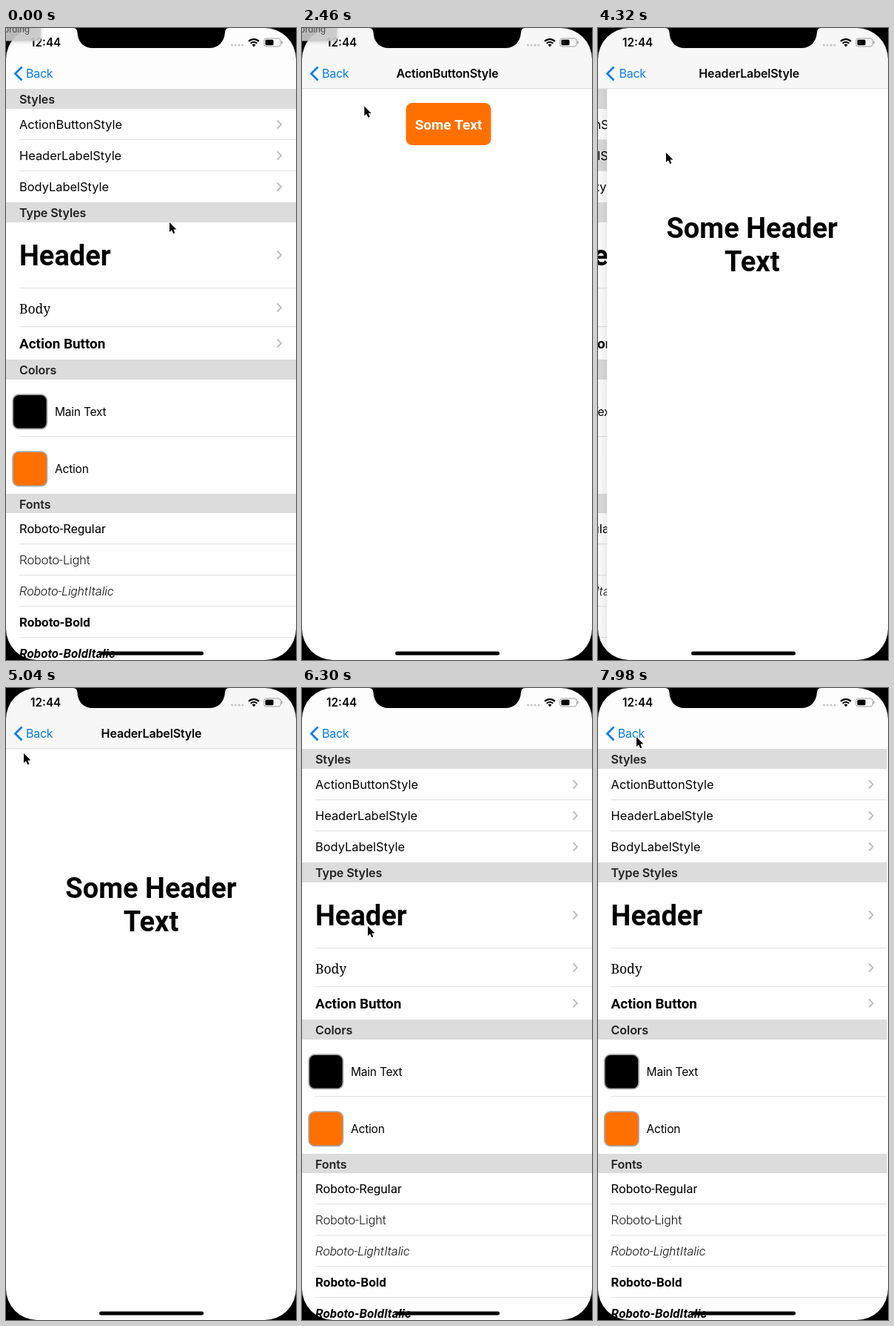
Recreate the animation shown at these times as an HTML page with a canvas. Size 392 by 852 pixels, loop 8000 ms.

```html
<!DOCTYPE html>
<html lang="en">
<head>
<meta charset="utf-8">
<title>Style browser</title>
<style>
html, body { margin: 0; width: 100%; height: 100%; overflow: hidden; background: #000; }
canvas { display: block; width: 392px; height: 852px; }
</style>
</head>
<body>
<canvas id="stage"></canvas>
<script>
const W = 392, H = 852, LOOP = 8000, NAV = 82;
const canvas = document.getElementById('stage');
const ctx = canvas.getContext('2d');
const dpr = window.devicePixelRatio || 1;
canvas.width = W * dpr;
canvas.height = H * dpr;

const UI = 'Inter, sans-serif', ROBOTO = 'Roboto, sans-serif';
const BODY = '16.1px ' + UI, ROW = '16.4px ' + UI, LABEL = '15.6px ' + UI, BOLD = '600 16.1px ' + UI;
const BLUE = '#067bf0', ORANGE = '#ff7000', INK = '#030303';
const PAPER = '#fefefe', BAND = '#dcdcdd', LINE = '#e4e4e5';

// Visits to a detail page: push time, pop time, row [top, height].
const visits = [
  { push: 835, pop: 2932, press: 750, backPress: 2690, row: [109, 41], page: actionPage, title: 'ActionButtonStyle' },
  { push: 4030, pop: 5230, press: 3940, backPress: 5150, row: [151, 41], page: headerPage, title: 'HeaderLabelStyle' },
  { push: 6385, pop: 7550, press: 6310, backPress: 7450, row: [262, 88], page: typePage, title: '' }
];

// Pointer stops: time, x, y.
const stops = [
  [0, 221, 262], [60, 221, 262], [660, 121, 136], [1340, 121, 136],
  [1680, 137, 156], [1960, 149, 153], [2250, 149, 153], [2660, 25, 62],
  [3360, 25, 62], [3840, 92, 168], [4580, 92, 168], [5040, 24, 88],
  [5140, 24, 64], [5700, 24, 64], [6240, 89, 321], [6960, 89, 321],
  [7400, 52, 66], [8000, 52, 66]
];

const clamp = v => Math.max(0, Math.min(1, v));
const mix = (a, b, k) => a + (b - a) * k;
const smooth = k => k * k * (3 - 2 * k);

// Critically damped spring of a navigation transition.
function spring(ms) {
  if (ms <= 0) return 0;
  if (ms > 540) return 1;
  const x = ms / 1000 * 18.26;
  return 1 - (1 + x) * Math.exp(-x);
}

function rect(x, y, w, h, color) {
  ctx.fillStyle = color;
  ctx.fillRect(x, y, w, h);
}

function round(x, y, w, h, r, color) {
  ctx.fillStyle = color;
  ctx.beginPath();
  ctx.roundRect(x, y, w, h, r);
  ctx.fill();
}

function text(str, x, y, font, color = INK, align = 'left', spacing = -0.1) {
  ctx.font = font;
  ctx.letterSpacing = spacing + 'px';
  ctx.textAlign = align;
  ctx.fillStyle = color;
  ctx.fillText(str, x, y);
}

function stroke(points, color, width) {
  ctx.strokeStyle = color;
  ctx.lineWidth = width;
  ctx.beginPath();
  points.forEach(([x, y]) => ctx.lineTo(x, y));
  ctx.stroke();
}

function band(label, y, h = 27) {
  rect(0, y, W, h, BAND);
  text(label, 18, y + 20, BOLD, '#222223');
}

function swatch(label, y, color) {
  round(8.3, y, 48, 48, 9, '#a8a8a8');
  round(10, y + 1.7, 44.6, 44.6, 7.5, color);
  text(label, 66, y + 30, LABEL, INK, 'left', -0.25);
}

function list(visit, selected) {
  rect(0, NAV, W, H - NAV, PAPER);
  if (selected) rect(0, visit.row[0], W, visit.row[1], '#dadadb');
  for (const y of [150, 192, 350, 402, 550, 695, 737, 779, 821])
    rect(18, y, W - 18, 1.2, LINE);

  band('Styles', 82);
  text('ActionButtonStyle', 18, 136, ROW, INK, 'left', 0);
  text('HeaderLabelStyle', 18, 178, ROW, INK, 'left', 0);
  text('BodyLabelStyle', 18, 220, ROW, INK, 'left', 0);
  band('Type Styles', 235);
  text('Header', 18, 319.5, 'bold 38px ' + ROBOTO, INK, 'left', 0);
  text('Body', 18, 384.5, '17.6px "Noto Serif", serif');
  text('Action Button', 18, 432, 'bold 18.9px ' + ROBOTO, INK, 'left', 0);
  for (const y of [130, 172, 214, 306, 377, 425])
    stroke([[366.5, y - 5.5], [372, y], [366.5, y + 5.5]], '#bebec0', 1.9);

  band('Colors', 447);
  swatch('Main Text', 493.3, '#000');
  swatch('Action', 570.3, ORANGE);
  band('Fonts', 628, 26);
  const faces = [['Regular', ''], ['Light', '300 '], ['LightItalic', 'italic 300 '],
    ['Bold', 'bold '], ['BoldItalic', 'italic bold ']];
  faces.forEach(([name, style], i) =>
    text('Roboto-' + name, 18, 681 + 42 * i, style + '17px ' + ROBOTO, INK, 'left', 0));
}

function actionPage(t) {
  round(140.5, 101, 115, 57, 8.5, ORANGE);
  const down = clamp((t - 1620) / 60) * (1 - clamp((t - 1760) / 200));
  ctx.globalAlpha = 1 - 0.7 * down;
  text('Some Text', 198, 136.5, 'bold 18.9px ' + ROBOTO, '#fffdfa', 'center', 0);
  ctx.globalAlpha = 1;
}

function headerPage() {
  const font = 'bold 38px ' + ROBOTO;
  text('Some Header', 196, 283, font, INK, 'center', 0);
  text('Text', 196, 327.5, font, INK, 'center', 0);
}

function typePage() {
  text('Header', 196.5, 136.5, 'bold 38px ' + ROBOTO, INK, 'center', 0);
  text('Roboto-Bold - 40.0pt', 196.5, 161.5, BODY, INK, 'center');
}

function detail(visit, p, t) {
  ctx.save();
  ctx.translate((1 - p) * W, 0);
  if (p < 1) {
    const g = ctx.createLinearGradient(-8, 0, 0, 0);
    g.addColorStop(0, 'rgba(0,0,0,0)');
    g.addColorStop(1, `rgba(0,0,0,${0.05 * p})`);
    rect(-8, NAV, 8, H, g);
  }
  rect(0, NAV, W, H - NAV, PAPER);
  visit.page(t);
  ctx.restore();
}

function navBar(visit, p, dim) {
  const tone = mix(253, 247, p);
  rect(0, 0, W, NAV, `rgb(${tone},${tone},${tone})`);
  if (p > 0) {
    ctx.globalAlpha = p;
    rect(0, NAV - 0.8, W, 1, '#dcdcdd');
  }
  const level = 1 - 0.7 * dim;
  ctx.globalAlpha = level;
  stroke([[21.5, 52.5], [12.5, 61.5], [21.5, 70.5]], BLUE, 2.7);
  if (p < 1) {
    ctx.globalAlpha = (1 - p) * level;
    text('Back', 27 - 77 * p, 67, BODY, BLUE, 'left', -0.3);
  }
  if (p > 0) {
    ctx.globalAlpha = p * level;
    text('Back', 27 + 46 * (1 - p), 67, BODY, BLUE, 'left', -0.3);
    ctx.globalAlpha = p;
    text(visit.title, 196.5 + 247 * (1 - p), 67, BOLD, INK, 'center', -0.2);
  }
  ctx.globalAlpha = 1;
}

function statusBar() {
  text('12:44', 33, 25, '600 15.3px ' + UI, INK, 'left', 0);
  for (let i = 0; i < 4; i++) round(304 + 4.8 * i, 21.5, 3, 3, 1.5, '#c4c4c5');
  ctx.strokeStyle = INK;
  ctx.lineWidth = 2.2;
  for (const r of [6, 9.8]) {
    ctx.beginPath();
    ctx.arc(335, 25, r, -Math.PI * 0.75, -Math.PI * 0.25);
    ctx.stroke();
  }
  ctx.fillStyle = INK;
  ctx.beginPath();
  ctx.moveTo(335, 25.5);
  ctx.arc(335, 25, 3.4, -Math.PI * 0.75, -Math.PI * 0.25);
  ctx.fill();
  ctx.strokeStyle = '#a0a0a0';
  ctx.lineWidth = 1;
  ctx.beginPath();
  ctx.roundRect(348.8, 14, 22.4, 11, 3);
  ctx.stroke();
  round(350.5, 15.7, 11, 7.6, 1.5, INK);
  round(372.2, 17.6, 1.4, 4, 0.7, '#a0a0a0');
}

function bezel() {
  ctx.fillStyle = '#000';
  ctx.beginPath();
  ctx.rect(0, 0, W, H);
  ctx.roundRect(0, 0, W, H, 42);
  ctx.fill('evenodd');
  ctx.beginPath();
  ctx.moveTo(91, 0);
  ctx.quadraticCurveTo(96, 0, 96.5, 6);
  ctx.bezierCurveTo(97, 19, 105, 27, 117, 27);
  ctx.lineTo(275, 27);
  ctx.bezierCurveTo(287, 27, 295, 19, 296, 6);
  ctx.quadraticCurveTo(296.5, 0, 301, 0);
  ctx.fill();
  round(126, 840.5, 141, 5, 2.5, '#000');
}

function tip(t) {
  const a = 1 - clamp((t - 3300) / 240);
  if (a <= 0) return;
  ctx.save();
  ctx.globalAlpha = a;
  ctx.shadowColor = 'rgba(40,40,40,.3)';
  ctx.shadowBlur = 5 * dpr;
  rect(-4, -4, 51, 21.5, 'rgba(205,205,205,.9)');
  ctx.restore();
  ctx.globalAlpha = a;
  text('ording', 32, 6, '11.5px ' + UI, '#484848', 'right', 0);
  ctx.globalAlpha = 1;
}

function pointer(t) {
  let i = 1;
  while (i < stops.length - 1 && t > stops[i][0]) i++;
  const [t0, x0, y0] = stops[i - 1], [t1, x1, y1] = stops[i];
  const k = smooth(clamp((t - t0) / (t1 - t0)));
  ctx.save();
  ctx.translate(mix(x0, x1, k), mix(y0, y1, k));
  ctx.beginPath();
  for (const [x, y] of [[0, 0], [0, 13], [3, 10.3], [5.2, 15.2], [7.4, 14.2], [5.3, 9.5], [9.4, 9.4]])
    ctx.lineTo(x, y);
  ctx.closePath();
  ctx.lineJoin = 'round';
  ctx.lineWidth = 1.8;
  ctx.strokeStyle = '#fff';
  ctx.stroke();
  ctx.fillStyle = '#000';
  ctx.fill();
  ctx.restore();
}

function draw(t) {
  const visit = visits.find(v => t >= v.press && t < v.pop + 560);
  let p = 0, dim = 0;
  if (visit) {
    p = t < visit.pop ? spring(t - visit.push) : 1 - spring(t - visit.pop);
    dim = clamp((t - visit.backPress) / 40) * (1 - clamp((t - visit.pop) / 60));
  }
  ctx.setTransform(dpr, 0, 0, dpr, 0, 0);
  ctx.lineJoin = 'miter';
  if (p < 1) {
    rect(0, 0, W, H, PAPER);
    ctx.save();
    ctx.translate(-0.3 * W * p, 0);
    list(visit, visit && t < visit.pop);
    ctx.restore();
    if (p > 0) rect(0, NAV, W, H, `rgba(0,0,0,${0.03 * p})`);
  }
  if (p > 0) detail(visit, p, t);
  navBar(visit, p, dim);
  statusBar();
  bezel();
  tip(t);
  pointer(t);
}

const start = performance.now();
function tick() {
  draw((performance.now() - start) % LOOP);
  requestAnimationFrame(tick);
}
tick();
</script>
</body>
</html>
```
